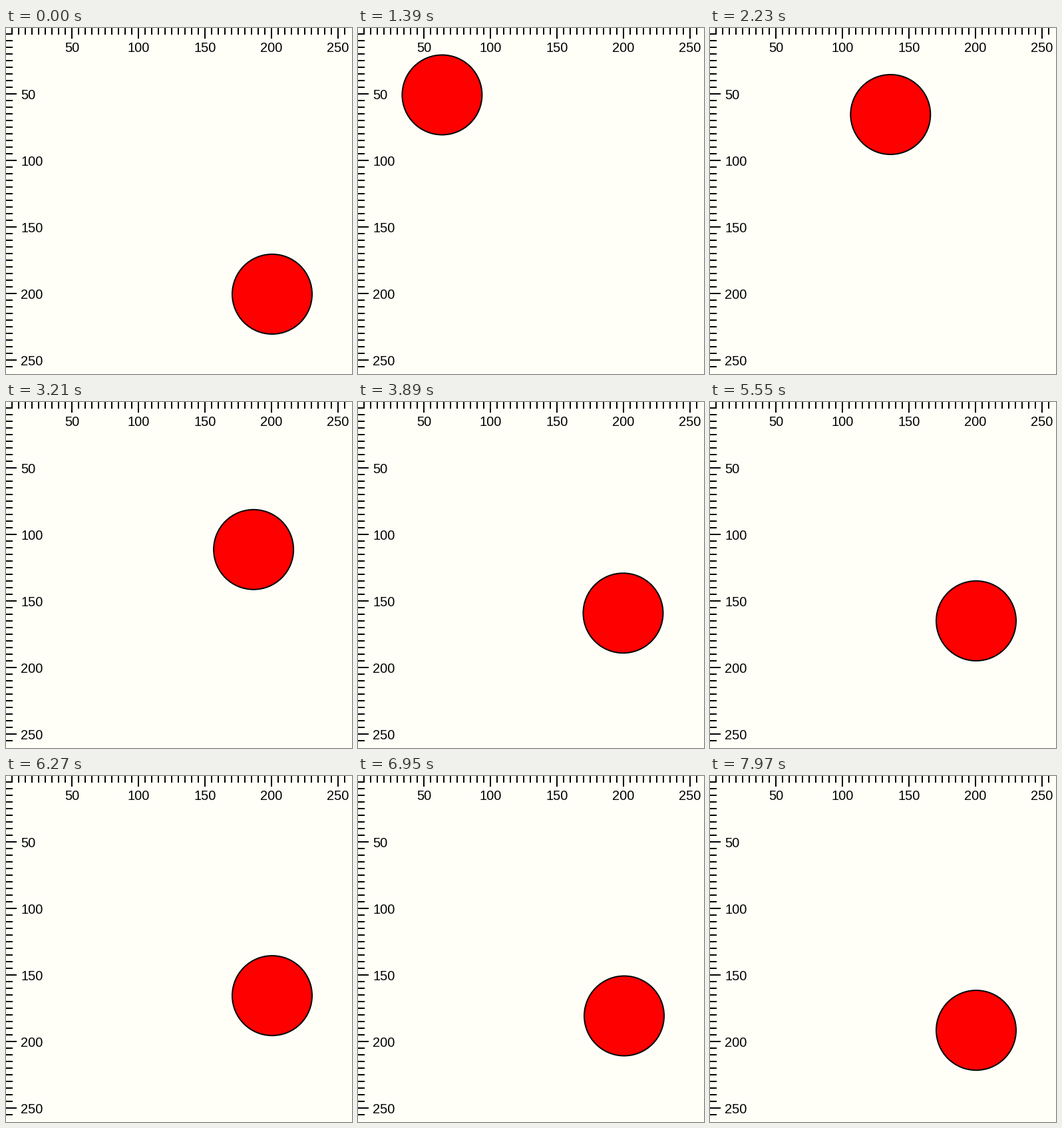
Recreate the animation shown at these times as a matplotlib script. Size 520 by 520 pixels, loop 8000 ms.

```python
import matplotlib.pyplot as plt
from matplotlib.animation import FuncAnimation
from matplotlib.collections import LineCollection
from matplotlib.patches import Circle

SIZE, DPI = 520, 100
STEP, LOOP = 20, 8000
PX = 72 / DPI
FONT = dict(family="Liberation Sans", fontsize=20 * PX, color="black")

NEAR, FAR = 100, 400
LAUNCH = 26.3                              # tick on which the throw begins
BACK, SLIDE, DROP = 30, 60, 180            # lengths in ticks

fig = plt.figure(figsize=(SIZE / DPI, SIZE / DPI), dpi=DPI, facecolor="#fffff8")
ax = fig.add_axes([0, 0, 1, 1])
ax.set_xlim(0, SIZE)
ax.set_ylim(SIZE, 0)
ax.axis("off")


def draw_rulers():
    ticks = []
    for unit in range(5, 260, 5):
        p = 2 * unit - 1
        length = 10
        if unit % 50 == 0:
            length = 16
            ax.text(p, 36, str(unit), ha="center", va="baseline", **FONT)
            ax.text(22, p + 8, str(unit), ha="left", va="baseline", **FONT)
        ticks += [[(p, 0), (p, length)], [(0, p), (length, p)]]
    ax.add_collection(LineCollection(ticks, colors="black", linewidths=2 * PX,
                                     capstyle="butt"))


def clamp(s):
    return min(max(s, 0), 1)


def ease_out(s, power):
    return 1 - (1 - s) ** power


def bounce_out(s):
    for start, mid, base in ((1, 0, 0), (2, 1.5, 0.75), (2.5, 2.25, 0.9375)):
        if s < start / 2.75:
            return 7.5625 * (s - mid / 2.75) ** 2 + base
    return 7.5625 * (s - 2.625 / 2.75) ** 2 + 0.984375


def tick_at(ms):
    """Ticks come in threes: two short ones, then a long one."""
    if ms < 30:
        return LAUNCH - BACK
    if ms < 90:
        return -2.6
    group, rest = divmod(ms - 90, 140)
    return 3 * group + min(rest // 20, 2)


def position(tick):
    if tick < LAUNCH:
        p = FAR + (NEAR - FAR) * ease_out(clamp((tick - LAUNCH + BACK) / BACK), 3)
        return p, p
    t = tick - LAUNCH
    span = FAR - NEAR
    return (NEAR + span * ease_out(clamp(t / SLIDE), 2),
            NEAR + span * bounce_out(clamp(t / DROP)))


draw_rulers()
ball = ax.add_patch(Circle((FAR, FAR), 60, facecolor="#ff0000",
                           edgecolor="black", linewidth=2 * PX, zorder=3))


def update(i):
    ball.center = position(tick_at(i * STEP + STEP // 2))
    return (ball,)


anim = FuncAnimation(fig, update, frames=LOOP // STEP, interval=STEP,
                     repeat=True, repeat_delay=0, blit=False)
plt.show()
```
